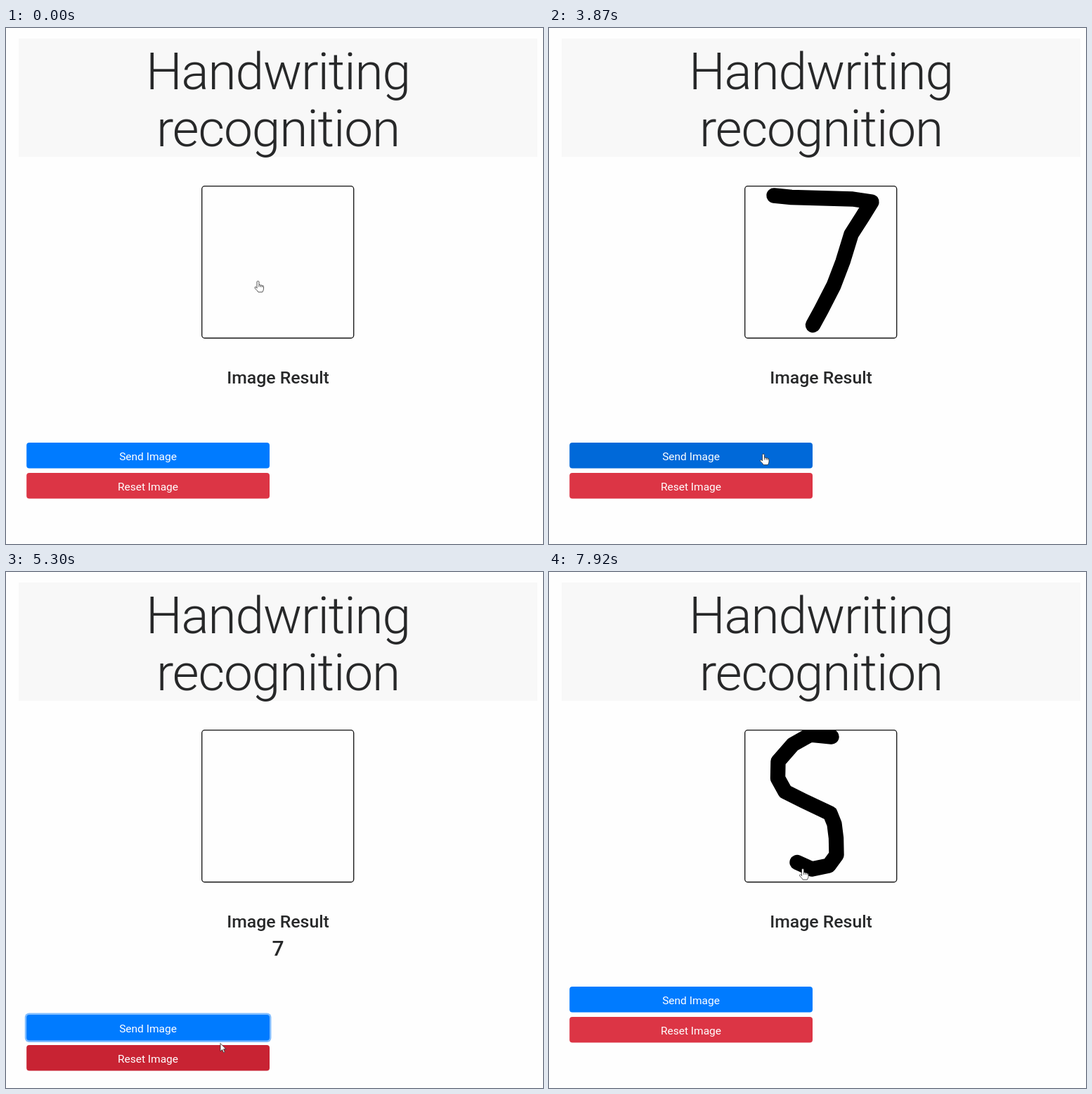
An HTML page with a canvas that plays this animation: 764 by 733 pixels, repeating every 8000 ms.

```html
<!DOCTYPE html>
<html lang="en">
<head>
<meta charset="utf-8">
<title>Handwriting recognition</title>
<style>
html, body { margin: 0; width: 100%; height: 100%; overflow: hidden; background: #fefefe; }
canvas { display: block; }
</style>
</head>
<body>
<canvas id="stage" width="764" height="733"></canvas>
<script>
const ctx = document.getElementById('stage').getContext('2d');
const LOOP = 8000, STEP = 203, LEAD = 25; // the screen refreshes in steps
const INK = '#272829';
const PAD = [278.7, 224.7, 216, 215.8];
const PEN_STEPS = 8; // each digit takes this many steps to write

function digit(start, end, d) {
  const line = document.createElementNS('http://www.w3.org/2000/svg', 'path');
  line.setAttribute('d', d);
  return { start, end, line, shape: new Path2D(d), length: line.getTotalLength() };
}

const digits = [
  digit(7, 26, 'M320 238L345 240.5L432 243L459 247L446 268L430 293L418 332L405 366L387 401L375.5 422'),
  digit(31, 40, 'M402 234L372 231L347 245L326 269L325.5 293L336 312L362 325L400 343L406 358' +
    'L408.5 378L409 402L398 417L374 422L353 412.5')
];

// Places the pointer passes when it is not writing: step, x, y.
const stops = [
  [0, 358.5, 359.5], [3, 374, 318], [6, 329, 246], [15, 383, 431], [19, 305, 605],
  [21, 305, 605], [24, 302.5, 677.5], [25, 303, 678], [26, 305, 669.5],
  [30, 399.5, 295], [31, 409, 244]
];

const written = (d, n) => d.length * Math.min(1, (n - d.start) / PEN_STEPS);
const within = ([x, y], [l, t, w, h]) => x >= l && x <= l + w && y >= t && y <= t + h;
const smooth = u => u * u * (3 - 2 * u);

function pointerAt(n) {
  const d = digits.find(d => n > d.start && n <= d.start + PEN_STEPS);
  if (d) {
    const p = d.line.getPointAtLength(written(d, n) + 8);
    return [p.x + 8, p.y + 9];
  }
  const i = stops.findIndex(s => s[0] > n);
  if (i < 0) return stops[stops.length - 1].slice(1);
  const [n0, x0, y0] = stops[i - 1], [n1, x1, y1] = stops[i];
  const u = smooth((n - n0) / (n1 - n0));
  return [x0 + (x1 - x0) * u, y0 + (y1 - y0) * u];
}

function answerAt(n) {
  if (n < 20 || n > 26) return '';
  return n < 24 ? 'Loading...' : '7';
}

function text(str, y, weight, size, x = 387, color = INK, gap = 0) {
  ctx.font = `${weight} ${size}px Roboto, "Open Sans", sans-serif`;
  ctx.letterSpacing = gap + 'px';
  ctx.textAlign = 'center';
  ctx.fillStyle = color;
  ctx.fillText(str, x, y);
}

function fillBox(x, y, w, h, r, color) {
  ctx.beginPath();
  ctx.roundRect(x, y, w, h, r);
  ctx.fillStyle = color;
  ctx.fill();
}

function button(label, [x, y, w, h], color, focused) {
  if (focused) fillBox(x - 2.4, y - 2.4, w + 4.8, h + 4.8, 6, '#80bdff');
  fillBox(x, y, w, h, 4, color);
  text(label, y + 24.5, 400, 15.5, 202, '#fff');
}

function drawDigit(d, n) {
  ctx.save();
  ctx.beginPath();
  ctx.rect(...PAD);
  ctx.clip();
  ctx.lineWidth = 21.4;
  ctx.lineCap = ctx.lineJoin = 'round';
  ctx.strokeStyle = '#000';
  ctx.setLineDash([written(d, n), 2 * d.length]);
  ctx.stroke(d.shape);
  ctx.restore();
}

const hand = new Path2D('M-1.5 10V1.4Q-1.4 0 0 0T1.5 1.4V5.6Q2.8 4.6 4 6Q5.3 5.2 6.2 6.6' +
  'Q8 6 8 8V11Q8 13 6.3 15.6H.3Q-1 13.4-4.2 10.4Q-5.2 8.6-3.6 8.2Q-2.6 8.4-1.5 10Z');
const knuckles = new Path2D('M1.5 5.6V8.4M4 6V8.6M6.2 6.6V8.8');
const arrow = new Path2D('M0 0V11.4L2.6 9L4.5 13.2L6.3 12.4L4.5 8.3H8Z');

function drawPointer([x, y], isHand) {
  const shape = isHand ? hand : arrow;
  ctx.save();
  ctx.translate(x, y);
  ctx.lineJoin = 'round';
  ctx.lineWidth = 0.8;
  ctx.fillStyle = '#fff';
  ctx.strokeStyle = '#2a2a2a';
  ctx.fill(shape);
  ctx.stroke(shape);
  if (isHand) ctx.stroke(knuckles);
  ctx.restore();
}

function draw(time) {
  const n = Math.floor((time + LEAD) / STEP);
  const answer = answerAt(n), pointer = pointerAt(n);
  const trail = pointerAt(Math.max(0, n - 0.6)); // hover colours lag the pointer
  const send = [29.2, answer ? 629 : 589, 345.8, 36.6];
  const reset = [29.2, send[1] + 43, 345.8, 36.6];

  fillBox(0, 0, 764, 733, 0, '#fefefe');
  fillBox(18, 15, 738, 168, 0, '#f8f8f8');
  text('Handwriting', 87, 300, 73, 387, INK, -1.1);
  text('recognition', 168, 300, 73, 387, INK, -1.1);

  digits.filter(d => n > d.start && n < d.end).forEach(d => drawDigit(d, n));
  ctx.beginPath();
  ctx.roundRect(...PAD, 4);
  ctx.lineWidth = 1.3;
  ctx.strokeStyle = '#111';
  ctx.stroke();

  text('Image Result', 505, 500, 24.8);
  text(answer, 545, 500, 30);
  button('Send Image', send, within(trail, send) ? '#0069d9' : '#007bff', answer);
  button('Reset Image', reset, within(trail, reset) ? '#c82333' : '#dc3545');
  drawPointer(pointer, [PAD, send, reset].some(area => within(pointer, area)));
}

let start;
function tick(now) {
  start ??= now;
  draw(Math.max(0, now - start) % LOOP);
  requestAnimationFrame(tick);
}
draw(0);
requestAnimationFrame(tick);
</script>
</body>
</html>
```
